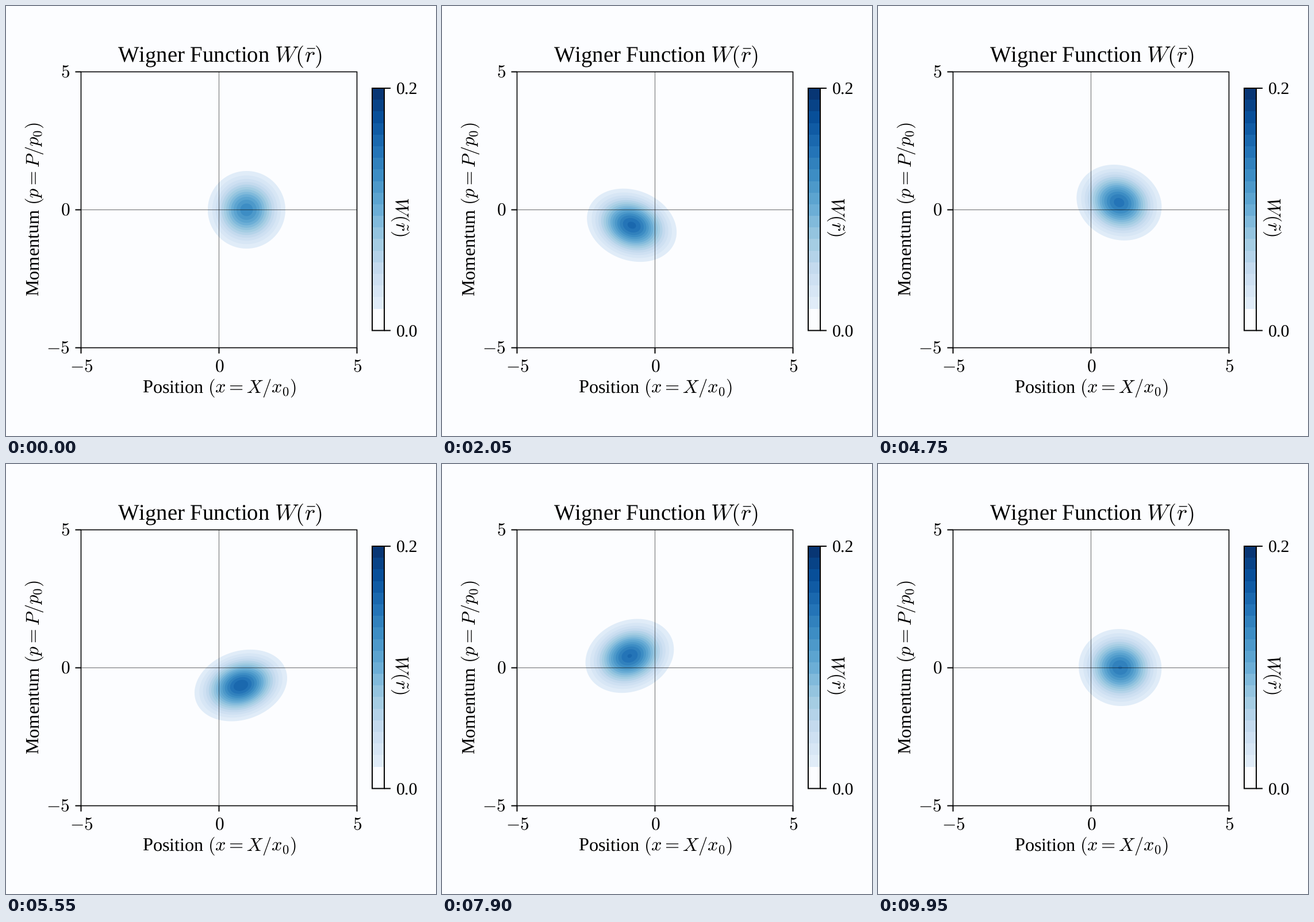
Recreate the animation shown at these times as a matplotlib script. Size 748 by 748 pixels, loop 10 s.

```python
import numpy as np
import matplotlib.pyplot as plt
from matplotlib.animation import FuncAnimation
from matplotlib.patches import Polygon, Rectangle

plt.rcParams.update({"font.family": "Liberation Serif", "mathtext.fontset": "cm",
                     "text.hinting": "none"})

SIZE, FRAMES, STEP = 748, 200, 50
PERIOD = 5                           # seconds per turn in phase space
PAPER = "#fcfdff"
CX, CY, UNIT = 370.5, 354.5, 48      # plot centre and pixels per unit
HALF = 5 * UNIT
LEFT, RIGHT, TOP, BOTTOM = CX - HALF, CX + HALF, CY - HALF, CY + HALF
BAR_X, BAR_W, BAR_TOP, BAR_BOTTOM = 637, 21, 143, 564.5
BAR_H = BAR_BOTTOM - BAR_TOP

# Evenly spaced colour bands; values below the first edge stay blank.
EDGES = np.linspace(.09, 1, 20)
LEVELS = .2 * EDGES
COLORS = plt.cm.Blues((EDGES[:-1] + EDGES[1:]) / 2)


def state(t):
    """Centre, half extents, correlation and peak of the packet at t seconds."""
    a = 2 * np.pi * t / PERIOD
    s2 = np.sin(a) ** 2
    settle = 1 - np.exp(-2 * t)      # the round start relaxes into the cycle
    x = (1 + .04 * settle) * np.cos(a) + settle * (.015 - .025 * np.sin(2 * a))
    p = -.88 * np.sin(a) - settle * (.03 + .05 * np.sin(3 * a) + .025 * np.cos(2 * a))
    w = 67.5 + 4.5 * settle + 21 * s2
    h = 67.5 - .5 * settle - 11.5 * s2
    peak = .13 + .013 * settle + .043 * s2
    return x, p, w, h, .21 * np.sin(2 * a), peak


fig = plt.figure(figsize=(SIZE / 72, SIZE / 72), dpi=72, facecolor=PAPER)
ax = fig.add_axes([0, 0, 1, 1])
ax.set(xlim=(0, SIZE), ylim=(SIZE, 0))
ax.axis("off")


def line(x0, y0, x1, y1, width=2, **style):
    ax.plot([x0, x1], [y0, y1], color="black", lw=width,
            solid_capstyle="butt", snap=False, **style)


def box(x, y, w, h, width):
    ax.add_patch(Rectangle((x, y), w, h, fill=False, ec="black", lw=width,
                           snap=False, zorder=3))


def label(x, y, text, size, ha="center", angle=0):
    ax.text(x, y, text, fontsize=size, ha=ha, va="baseline", color="black",
            rotation=angle, rotation_mode="anchor")


# Packet: one filled ellipse per level, darker towards the middle.
phi = np.linspace(0, 2 * np.pi, 121)
cos_phi, sin_phi = np.cos(phi), np.sin(phi)
rings = [ax.add_patch(Polygon(np.zeros((3, 2)), fc=color, ec="none", zorder=1))
         for color in COLORS]

# Plot frame, zero lines and ticks.
line(LEFT, CY, RIGHT, CY, 1.2, alpha=.5, zorder=2)
line(CX, TOP, CX, BOTTOM, 1.2, alpha=.5, zorder=2)
box(LEFT, TOP, 2 * HALF, 2 * HALF, 1.6)
for value in (-5, 0, 5):
    x, y = CX + UNIT * value, CY - UNIT * value
    line(x, BOTTOM, x, BOTTOM + 10)
    line(LEFT - 10, y, LEFT, y)
    label(x + .5, 636, f"${value}$", 31.5)
    label(111, y + 10, f"${value}$", 31.5, ha="right")

label(371.5, 97, r"Wigner Function $W(\bar{r})$", 38.8)
label(371.5, 673, r"Position $(x = X/x_0)$", 32.4)
label(58, 354, r"Momentum $(p = P/p_0)$", 32.4, angle=90)

# Colour bar.
for low, high, color in zip(EDGES[:-1], EDGES[1:], COLORS):
    ax.add_patch(Rectangle((BAR_X, BAR_BOTTOM - high * BAR_H), BAR_W,
                           (high - low) * BAR_H, fc=color, ec="none",
                           antialiased=False))
box(BAR_X, BAR_TOP, BAR_W, BAR_H, 2)
for y, text in ((BAR_TOP, "0.2"), (BAR_BOTTOM, "0.0")):
    line(BAR_X + BAR_W, y, 669, y)
    label(678.5, y + 11, text, 30, ha="left")
label(677, 366.5, r"$W(\tilde{r})$", 32.4, angle=270)


def update(i):
    x, p, w, h, rho, peak = state(i * STEP / 1000)
    dx = w * cos_phi
    dy = h * (rho * cos_phi + np.sqrt(1 - rho ** 2) * sin_phi)
    for ring, level in zip(rings, LEVELS):
        visible = level < peak
        ring.set_visible(visible)
        if visible:
            k = np.sqrt(np.log(peak / level) / np.log(peak / LEVELS[0]))
            ring.set_xy(np.column_stack([CX + UNIT * x + k * dx,
                                         CY - UNIT * p - k * dy]))
    return rings


anim = FuncAnimation(fig, update, frames=FRAMES, interval=STEP,
                     repeat=True, repeat_delay=0, blit=False)
plt.show()
```
